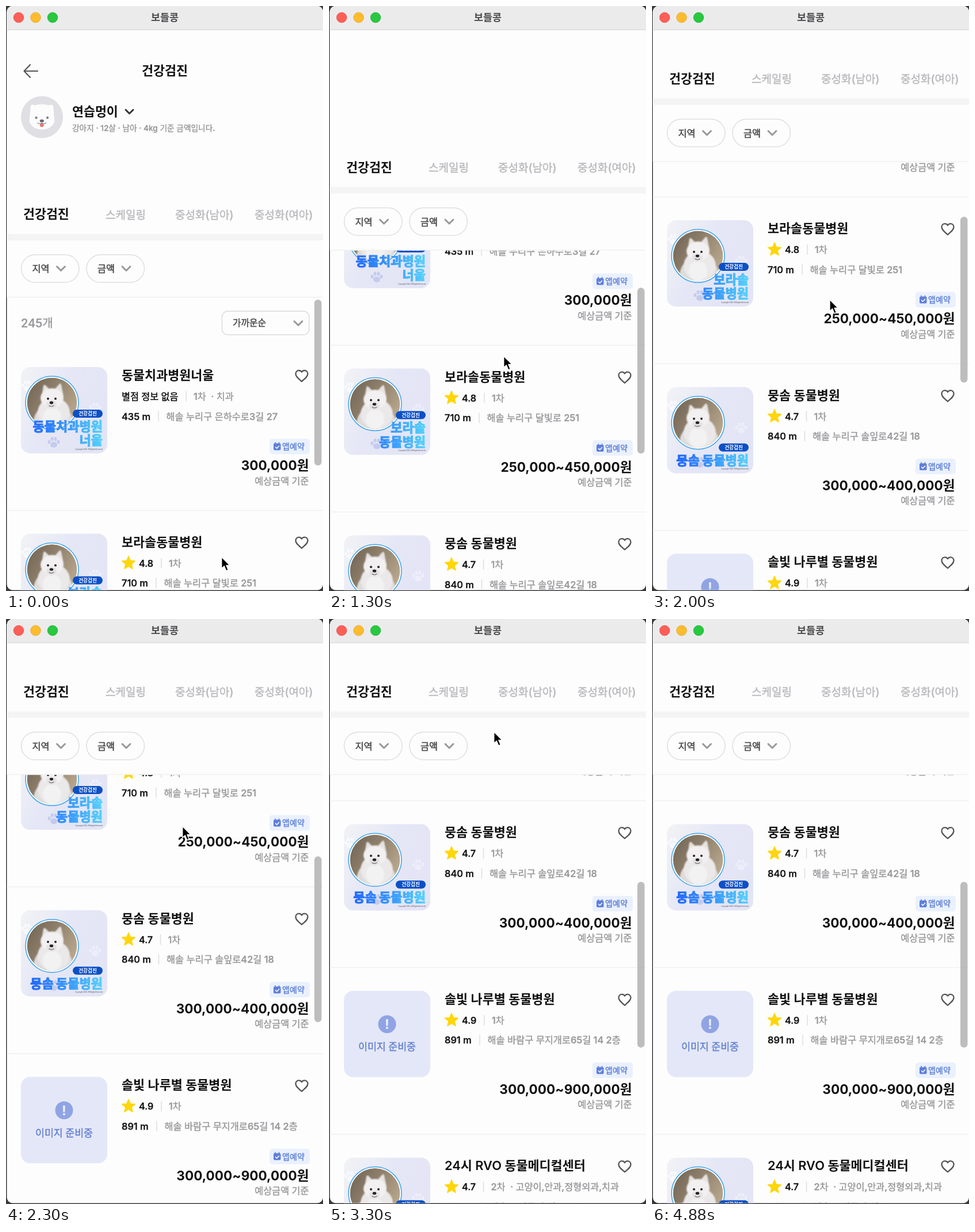
An HTML page that plays this animation: 551 by 1016 pixels, repeating every 4.96 s.

```html
<!DOCTYPE html>
<html lang="ko">
<head>
<meta charset="utf-8">
<title>보들콩</title>
<style>
html, body { margin: 0; width: 100%; height: 100%; overflow: hidden; background: #3b3b3d; }
svg { display: block; width: 551px; height: 1016px; }
text { font-family: Inter, "Noto Sans CJK KR", "Noto Sans CJK", sans-serif; white-space: pre; }
</style>
</head>
<body>
<svg id="stage" viewBox="0 0 551 1016"></svg>
<script>
const INK = '#111', GREY = '#98989b', LINE = '#efeff0', PAPER = '#fdfdfd';
const PITCH = 289.6, FIRST = 627;
// thin outlines stand in for the weights a two-weight font lacks
const OUTLINE = { 500: 0.4, 900: 1.1 };

const rect = (x, y, w, h, fill, r = 0, extra = '') =>
  `<rect x="${x}" y="${y}" width="${w}" height="${h}" rx="${r}" fill="${fill}" ${extra}/>`;
const circle = (x, y, r, fill, extra = '') =>
  `<circle cx="${x}" cy="${y}" r="${r}" fill="${fill}" ${extra}/>`;
const oval = (x, y, rx, ry, fill) =>
  `<ellipse cx="${x}" cy="${y}" rx="${rx}" ry="${ry}" fill="${fill}"/>`;
const path = (d, stroke, w, fill = 'none') =>
  `<path d="${d}" fill="${fill}" stroke="${stroke}" stroke-width="${w}" stroke-linecap="round" stroke-linejoin="round"/>`;
const group = (x, y, body, extra = '') => `<g transform="translate(${x} ${y})" ${extra}>${body}</g>`;
// y is the visual middle of the line
const text = (x, y, size, weight, fill, str, anchor = 'start') =>
  `<text x="${x}" y="${y + size * 0.37}" font-size="${size}" font-weight="${weight}" fill="${fill}" stroke="${fill}" stroke-width="${OUTLINE[weight] || 0}" text-anchor="${anchor}">${str}</text>`;
const chevron = (x, y, color, s = 7) =>
  path(`M${x - s} ${y - s / 2}l${s} ${s}l${s} ${-s}`, color, 3);
const bar = (x, y) => rect(x - 0.75, y - 9, 1.5, 18, '#dededf');

const paw = (x, y, fill) => group(x, y,
  oval(0, 4, 6, 5, fill) + oval(-8, -1, 2.5, 3.2, fill) + oval(-3, -6, 2.5, 3.4, fill) +
  oval(3, -6, 2.5, 3.4, fill) + oval(8, -1, 2.5, 3.2, fill));

const star = (x, y) => {
  let d = '';
  for (let i = 0; i < 10; i++) {
    const r = i % 2 ? 5.4 : 12, a = i * Math.PI / 5;
    d += (i ? 'L' : 'M') + (x + r * Math.sin(a)).toFixed(1) + ' ' + (y - r * Math.cos(a)).toFixed(1);
  }
  return path(d + 'z', '#ffd60a', 1.5, '#ffd60a');
};

const heart = y => group(514, y, path('M0 9.500C-6 4.500 -10.500 1 -10.500 -3.500C-10.500 -7 -8 -9.500 -5 -9.500' +
  'C-3 -9.500 -1 -8.500 0 -6.700C1 -8.500 3 -9.500 5 -9.500C8 -9.500 10.500 -7 10.500 -3.500C10.500 1 6 4.500 0 9.500z', '#555557', 2.3));

const dog = group(54, 62,
  circle(0, 0, 46, PAPER, 'stroke="#3ba4ee" stroke-width="1.5"') +
  '<g clip-path="url(#round)">' + circle(0, 0, 43.5, 'url(#photo)') +
  '<g filter="url(#soft)">' + oval(2, 34, 34, 33, '#dedcdb') + oval(3, 17, 28, 26, '#eae8e8') +
  path('M-16 -11L-13 -29L-5 -21L6 -22L14 -31L18 -11z', '#e6e3e1', 4, '#e6e3e1') +
  oval(0, -8, 20, 17, '#f2f0f0') + oval(0, 26, 16, 18, '#f3f2f2') + oval(-1, 3, 9, 7, '#e4e1e1') + '</g>' +
  circle(-7, -7, 2, '#29272a') + circle(6, -7, 2, '#29272a') + oval(-1, 0, 3.2, 2.4, '#242226') +
  path('M-5 5q4 3 8 0', '#77706f', 1.2) + '</g>');

function thumb(lines) {
  if (!lines) return rect(0, 0, 150, 150, '#e4e7f7', 16) + circle(75, 58, 15.5, '#90a4e4') +
    text(75, 58, 23, 700, '#edf0fc', '!', 'middle') +
    text(75, 97, 17.3, 500, '#6380d2', '이미지 준비중', 'middle');
  const top = lines.length > 1 ? 74 : 98;
  return rect(0, 0, 150, 150, 'url(#card)', 16) +
    paw(129, 71, '#eceefa') + paw(11, 33, '#f8f9fc') + paw(57, 131, '#c4cbed') + dog +
    rect(90, top, 52, 14, '#0c50c6', 7) +
    text(116, top + 7, 8.6, 700, '#fff', '건강검진', 'middle') +
    lines.map((s, i) => text(142, 127 - 24.5 * (lines.length - 1 - i), 22, 900, 'url(#ink)', s, 'end')).join('') +
    text(142, 142.5, 2.8, 400, '#444', 'Copyright 2024. All Rights Reserved', 'end');
}

const items = [
  { name: '동물치과병원너울', kind: '1차  · 치과', far: '435 m', at: '해솔 누리구 은하수로3길 27',
    price: '300,000', bars: [313, 265], art: ['동물치과병원', '너울'] },
  { name: '보라솔동물병원', rate: 4.8, kind: '1차', far: '710 m', at: '해솔 누리구 달빛로 251',
    price: '250,000~450,000', bars: [270, 261], art: ['보라솔', '동물병원'] },
  { name: '뭉솜 동물병원', rate: 4.7, kind: '1차', far: '840 m', at: '해솔 누리구 솔잎로42길 18',
    price: '300,000~400,000', bars: [268.5, 265.5], art: ['뭉솜 동물병원'] },
  { name: '솔빛 나루별 동물병원', rate: 4.9, kind: '1차', far: '891 m', at: '해솔 바람구 무지개로65길 14 2층',
    price: '300,000~900,000', bars: [270, 262] },
  { name: '24시 RVO 동물메디컬센터', rate: 4.7, kind: '2차  · 고양이,안과,정형외과,치과', far: '930 m',
    at: '해솔 누리구 솔잎로 327', price: '300,000', bars: [268.5, 266], art: ['동물메디컬', '센터'] }
];

const row = (it, i) => group(0, FIRST + i * PITCH,
  group(26, 0, thumb(it.art)) +
  text(201, 14, 21.8, 600, INK, it.name) + heart(15.5) +
  (it.rate ? star(213, 51) + text(231, 51, 16.3, 500, INK, it.rate)
           : text(201, 51, 16.3, 500, INK, '별점 정보 없음')) +
  bar(it.bars[0], 51) + text(it.bars[0] + 13, 51, 16.3, 500, GREY, it.kind) +
  text(201, 85.5, 16.5, 500, INK, it.far) +
  bar(it.bars[1], 85.5) + text(it.bars[1] + 13.5, 85.5, 16.4, 500, GREY, it.at) +
  rect(458, 124.5, 70, 27, '#eaf1fd', 5) +
  rect(465, 132.5, 12.5, 12, '#5f7fdc', 2) + path('M468 131v3M474.500 131v3', '#5f7fdc', 1.6) +
  path('M468.500 139l2.200 2.200l3.800 -4', '#fff', 1.5) +
  text(480, 138, 14.1, 500, '#5f80d6', '앱예약') +
  text(526.5, 171, 22.6, 700, INK, it.price + '원', 'end') +
  text(526.5, 197.5, 16.3, 500, GREY, '예상금액 기준', 'end') +
  rect(0, 248.5, 551, 1.3, LINE), i ? '' : 'id="first"');

const pill = (x, label) =>
  rect(x, 432, 100.5, 48, PAPER, 24, 'stroke="#dfdfe0" stroke-width="1.5"') +
  text(x + 19, 456, 16.3, 500, '#444446', label) + chevron(x + 69, 456, '#98989b');

const pet =
  circle(62.5, 193, 36.5, '#dfdfe4') +
  path('M43 178Q42 169 50 173Q62 169 75 173Q83 169 82 178L84 201Q79 214 62.500 214Q46 214 41 201z', '#fcfcfc', 1, '#fcfcfc') +
  circle(52.5, 194, 2.2, '#87858a') + circle(72, 194, 2.2, '#87858a') +
  oval(62.3, 199.5, 3.6, 2.5, '#66646b') + oval(62.3, 207, 3.5, 3.3, '#e77a70') +
  path('M55 203q4 3 7.300 0q3.500 3 7.300 0', '#87858a', 1.2) +
  text(115, 183, 21.7, 600, INK, '연습멍이') + chevron(214.5, 183.5, '#333335', 6.5) +
  text(115, 212, 13.7, 500, GREY, '강아지 · 12살 · 남아 · 4kg 기준 금액입니다.');

const header =
  rect(0, -20, 551, 525.5, PAPER) +
  `<g id="fade">${path('M55 113H32M42 102L31.500 113L42 124', '#555557', 2.2)}` +
  text(276, 112, 21.8, 600, INK, '건강검진', 'middle') + pet + '</g>' +
  text(30, 361, 21.7, 600, INK, '건강검진') +
  text(173, 362.5, 19, 500, '#b9b9bd', '스케일링') +
  text(294, 362.5, 19, 500, '#b9b9bd', '중성화(남아)') +
  text(432, 362.5, 19, 500, '#b9b9bd', '중성화(여아)') +
  rect(0, 396, 551, 11, '#f4f4f5') + pill(26.5, '지역') + pill(140, '금액') +
  rect(0, 505, 551, 1.3, LINE);

const list =
  text(26, 550.5, 20, 500, GREY, '245개') +
  rect(375.5, 530, 151.5, 41, PAPER, 10, 'stroke="#dcdcdd" stroke-width="1.5"') +
  text(394, 550.5, 15.8, 500, '#444446', '가까운순') + chevron(508, 551, '#98989b') +
  items.map(row).join('');

const light = (x, fill, edge) => circle(x, 20, 8.8, fill, `stroke="${edge}" stroke-width=".8"`);
const titleBar =
  rect(0, 0, 551, 41, '#ecebec') + rect(0, 41, 551, 1, '#d6d5d6') +
  light(22, '#fd5f57', '#e0524b') + light(51.5, '#fdbc2e', '#e0a528') + light(81, '#28c840', '#24b038') +
  text(276, 20, 17.4, 700, '#4b4a4c', '보들콩', 'middle');

const stops = (...colors) => colors.map((c, i) =>
  `<stop offset="${i / (colors.length - 1)}" stop-color="${c}"/>`).join('');

document.getElementById('stage').innerHTML = `<defs>
  <linearGradient id="card" x2="1" y2=".5">${stops('#f2f3f6', '#e5e7f6', '#e3e5f6')}</linearGradient>
  <linearGradient id="photo" y2=".6">${stops('#6f6252', '#8f806c', '#b8a78d')}</linearGradient>
  <linearGradient id="ink" gradientUnits="userSpaceOnUse" x1="15" x2="142">${stops('#2468fb', '#3795fb', '#54d2fb')}</linearGradient>
  <filter id="soft"><feGaussianBlur stdDeviation="1.3"/></filter>
  <clipPath id="round"><circle r="43.5"/></clipPath>
  <clipPath id="window"><rect x="1.5" width="549.5" height="1014.5" rx="10"/></clipPath></defs>` +
  `<g clip-path="url(#window)">${rect(0, 0, 551, 1016, PAPER)}<g id="list">${list}</g>` +
  `<g id="header">${header}</g>${titleBar}</g>` +
  rect(536, 0, 12.5, 288, '#b4b4b5', 6.2, 'id="thumb" fill-opacity=".88"') +
  `<g id="cursor">${path('M0 0V20L4.600 15.800L8 24L11.600 22.500L8.200 14.500H14.500z', '#fff', 1.4, '#000')}</g>`;

// time, cursor x, cursor y, list scroll, header collapse
const keys = [
  [0, 374, 957, 0, 0], [700, 340, 836, 0, 0], [800, 339, 834, 0, 0], [900, 338, 827, 7.7, 0],
  [1100, 319, 705, 110, 0], [1300, 303, 608, 205.5, 81.5], [1500, 305, 578, 236, 165],
  [1800, 309, 570, 246, 227], [1900, 309, 560, 257, 235.5], [2300, 306, 360, 465, 235.5],
  [2600, 298, 262, 557, 235.5], [3000, 288, 203, 609, 235.5], [3300, 286, 196, 614.5, 235.5],
  [3500, 280, -30, 614.5, 235.5], [4960, 280, -30, 614.5, 235.5]
];

function pose(t) {
  const i = keys.findIndex(k => k[0] > t), a = keys[i - 1], b = keys[i];
  const p = (t - a[0]) / (b[0] - a[0]);
  return a.map((v, j) => v + (b[j] - v) * p).slice(1);
}

const el = id => document.getElementById(id);
const move = (id, x, y) => el(id).setAttribute('transform', `translate(${x} ${y})`);

function draw(now) {
  const t = Math.floor(now % 4960 / 100) * 100;
  const [x, y, scroll, fold] = pose(t);
  move('list', 0, -scroll - fold);
  move('header', 0, -fold);
  move('cursor', x + 0.7, y);
  el('thumb').setAttribute('y', 510 - fold + scroll * 0.296);
  el('fade').setAttribute('opacity', Math.max(0, 1 - fold / 60));
  const press = Math.max(0, 1 - Math.abs(t - 900) / 150), s = 1 - 0.009 * press;
  el('first').setAttribute('transform',
    `translate(276 ${FIRST + 120}) scale(${s}) translate(-276 -120)`);
  el('first').setAttribute('opacity', 1 - 0.25 * press);
  requestAnimationFrame(draw);
}
requestAnimationFrame(draw);
</script>
</body>
</html>
```
